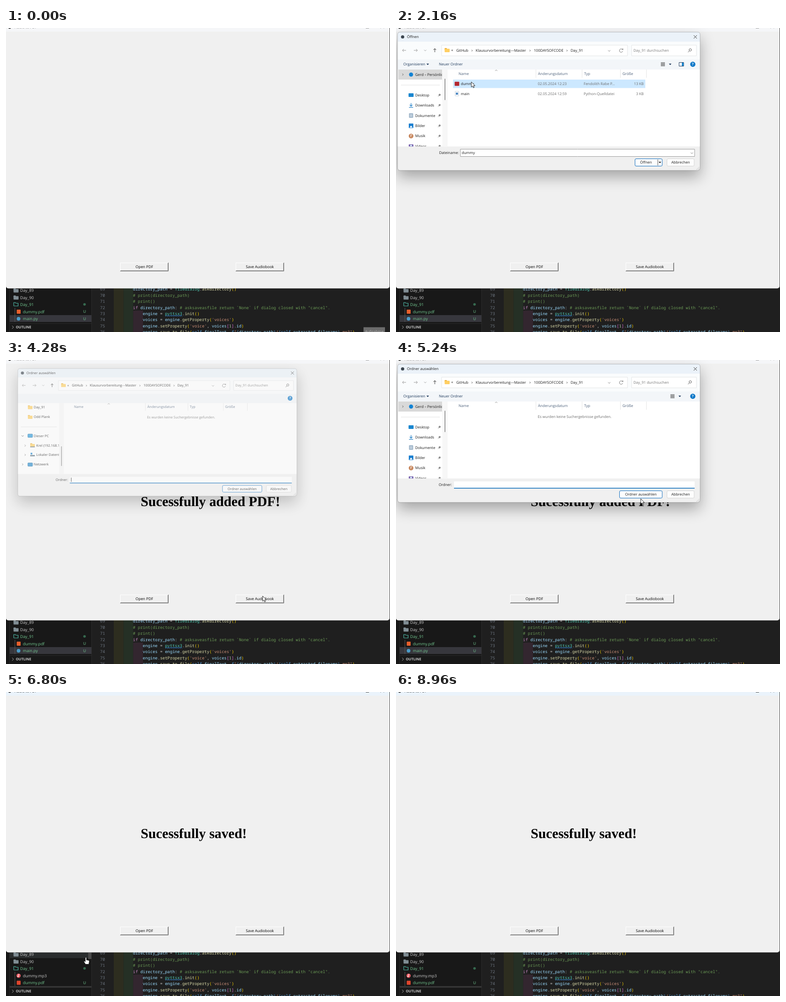
Recreate the animation shown at these times as an HTML page with a canvas. Size 841 px wide and 666 px high, loop 9020 ms.

```html
<!DOCTYPE html>
<html lang="de">
<head>
<meta charset="utf-8">
<title>PDF to audiobook</title>
<style>
html, body { margin: 0; width: 100%; height: 100%; overflow: hidden; background: #1f1f1f; }
canvas { display: block; }
</style>
</head>
<body>
<canvas id="stage" width="841" height="666"></canvas>
<script>
const W = 841, H = 666, LOOP = 9020;
const UI = '"Open Sans", "Noto Sans", sans-serif';
const MONO = '"Noto Sans Mono", "DejaVu Sans Mono", monospace';
const SERIF = '"Liberation Serif", serif';
const screen = document.getElementById('stage').getContext('2d');
const layerCanvas = document.createElement('canvas');
layerCanvas.width = W;
layerCanvas.height = H;
const layer = layerCanvas.getContext('2d');
// Fractional glyph advances keep small text at its true width
screen.textRendering = layer.textRendering = 'geometricPrecision';
let g = screen;

// Moments of the story
const OPEN_IN = 1202, OPEN_OUT = 3020, PICK = 2160;
const SAVE_IN = 4236, SAVE_OUT = 5300, SAVED = 5850, FILE_ADDED = 6050;

// Pointer path: time, x, y
const PATH = [
  [400, 776, 636], [750, 313, 524], [1140, 313, 524], [1350, 302, 469],
  [1760, 155, 96], [1900, 155, 96], [1960, 165, 118], [2200, 165, 118],
  [2860, 551, 301], [3150, 551, 301], [3800, 562, 517], [4350, 562, 517],
  [5030, 536, 304], [5850, 536, 304], [6740, 175, 581], [6800, 175, 581],
  [7270, 150, 620], [7490, 150, 620], [7750, 178, 592], [8350, 461, 655],
  [8480, 466, 668]
];

const clamp = v => Math.max(0, Math.min(1, v));
const within = (t, a, b) => t >= a && t < b;

function pointerAt(t) {
  for (let i = 1; i < PATH.length; i++) {
    const [t0, x0, y0] = PATH[i - 1], [t1, x1, y1] = PATH[i];
    if (!within(t, t0, t1)) continue;
    const p = (t - t0) / (t1 - t0), e = p * p * (3 - 2 * p);
    return { x: x0 + (x1 - x0) * e, y: y0 + (y1 - y0) * e };
  }
  return null;
}

function box(x, y, w, h, fill, stroke, r = 0) {
  g.beginPath();
  g.roundRect(x, y, w, h, r);
  if (fill) { g.fillStyle = fill; g.fill(); }
  if (stroke) { g.strokeStyle = stroke; g.lineWidth = 1; g.stroke(); }
}

function dot(x, y, r, color) {
  g.beginPath();
  g.arc(x, y, r, 0, 7);
  g.fillStyle = color;
  g.fill();
}

function line(color, width, ...pts) {
  g.beginPath();
  for (let i = 0; i < pts.length; i += 2) g.lineTo(pts[i], pts[i + 1]);
  g.strokeStyle = color;
  g.lineWidth = width;
  g.stroke();
}

function shape(fill, ...pts) {
  g.beginPath();
  for (let i = 0; i < pts.length; i += 2) g.lineTo(pts[i], pts[i + 1]);
  g.closePath();
  g.fillStyle = fill;
  g.fill();
}

// y is the middle of the line of text
function text(s, x, y, color = '#1b1b1b', size = 8, align = 'left', family = UI, weight = '') {
  g.font = `${weight} ${size}px ${family}`;
  g.textAlign = align;
  g.fillStyle = color;
  g.fillText(s, x, y + size * 0.35);
}

const down = (x, y, c = '#444', r = 2.5) => line(c, 0.9, x - r, y - r / 2, x, y + r / 2, x + r, y - r / 2);
const right = (x, y, c = '#555', r = 2.2) => line(c, 0.9, x - r / 2, y - r, x + r / 2, y, x - r / 2, y + r);
const drop = (x, y, c = '#222') => shape(c, x - 2.8, y - 1.4, x + 2.8, y - 1.4, x, y + 1.8);

function folder(x, y, color = '#ffcf62', back = '#e8a92f') {
  box(x - 5.5, y - 4.5, 5, 4, back, null, 1);
  box(x - 5.5, y - 3, 11, 7.5, color, null, 1);
}

// ---- editor behind the window ----

const INK = { w: '#cccccc', v: '#9cdcfe', f: '#dcdcaa', m: '#4ec9b0', s: '#ce9178', c: '#6a9955',
  k: '#c586c0', b: '#569cd6', n: '#b5cea8', y: '#ffd700', p: '#da70d6' };
const CODE = [
  ['v', 'directory_path', 'w', ' = ', 'm', 'filedialog', 'w', '.', 'f', 'askdirectory', 'y', '()'],
  ['c', '# print(directory_path)'],
  ['c', '# print()'],
  ['k', 'if', 'v', ' directory_path', 'w', ': ', 'c',
    '# asksaveasfile return `None` if dialog closed with "cancel".'],
  ['v', '    engine', 'w', ' = ', 'm', 'pyttsx3', 'w', '.', 'f', 'init', 'y', '()'],
  ['v', '    voices', 'w', ' = ', 'v', 'engine', 'w', '.', 'f', 'getProperty', 'y', '(', 's', "'voices'", 'y', ')'],
  ['v', '    engine', 'w', '.', 'f', 'setProperty', 'y', '(', 's', "'voice'", 'w', ', ', 'v', 'voices',
    'p', '[', 'n', '1', 'p', ']', 'w', '.', 'v', 'id', 'y', ')'],
  ['v', '    engine', 'w', '.', 'f', 'save_to_file', 'y', '(', 'b', 'self', 'w', '.', 'v', 'finalText', 'w', ', ',
    'b', 'f', 's', '"', 'b', '{', 'v', 'directory_path', 'b', '}', 's', '/', 'b', '{self', 'w', '.',
    'v', 'extracted_filename', 'b', '}', 's', '.mp3"', 'y', ')']
];

function drawCode() {
  const step = 5.4;
  box(188, 560, 653, 106, '#1f1f1f');
  box(236, 560, 21.5, 106, '#2d2d1f');
  box(257.5, 560, 21, 106, '#253025');
  box(278.5, 619, 21.5, 47, '#33262f');
  CODE.forEach((tokens, i) => {
    const y = 572.3 + i * 13.35;
    text(String(69 + i), 206, y, '#6e7681', 9, 'left', MONO);
    let x = 278;
    for (let k = 0; k < tokens.length; k += 2) {
      text(tokens[k + 1], x, y, INK[tokens[k]], 9, 'left', MONO, 500);
      x += tokens[k + 1].length * step;
    }
  });
  g.beginPath();
  for (let x = 349; x < 386; x += 0.5) g.lineTo(x, 630.5 + Math.sin(x * 1.6));
  g.strokeStyle = '#3794ff';
  g.lineWidth = 0.9;
  g.stroke();
}

function drawTree(t, ptr) {
  const rowY = i => 575 + i * 15.5, green = '#73c991', grey = '#cccccc';
  const added = t >= FILE_ADDED;
  box(0, 560, 187, 106, '#181818');
  line('#2b2b2b', 1, 187.5, 560, 187.5, H);
  line('#2b2b2b', 1, 7.5, 560, 7.5, H);
  const inTree = ptr && ptr.x < 187 && ptr.y > 570;
  if (!added) box(8, 629, 179, 15, '#37373d');
  if (inTree && ptr.y < 645) {
    const i = Math.round((ptr.y - 575) / 15.5);
    box(8, rowY(i) - 7.5, 179, 15.5, '#2a2d2e');
  }
  folder(22, rowY(0), '#7f8c93', '#7f8c93');
  folder(22, rowY(1), '#7f8c93', '#7f8c93');
  line('#4db6a4', 1.2, 17, 609, 17, 601.5, 20.5, 601.5, 22, 603, 26.5, 603, 26.5, 609, 17, 609);
  text('Day_89', 31, rowY(0), grey, 8.8);
  text('Day_90', 31, rowY(1), grey, 8.8);
  text('Day_91', 31, rowY(2), green, 8.8);
  dot(172, 605.5, 2.8, '#36694e');
  line('#585858', 1, 19.5, 613, 19.5, 644);
  const pdfY = rowY(added ? 4 : 3);
  box(23.5, pdfY - 4.5, 8.5, 9, added ? '#e0452c' : '#e8602c', null, 1);
  text('dummy.pdf', 37, pdfY, green, 8.8);
  text('U', 169, pdfY, green, 8.5);
  if (added) {
    dot(27.5, rowY(3), 4.6, '#ef5c64');
    line('#fff', 0.9, 27.2, 623, 27.2, 618.5, 29.4, 619.5);
    dot(26.4, 623, 1.2, '#fff');
    text('dummy.mp3', 37, rowY(3), grey, 8.8);
    box(8, 644.5, 179, 3, '#3a3a3a');
  } else {
    dot(27.5, rowY(4), 4, '#4b9cc8');
    text('main.py', 37, rowY(4), green, 8.8);
    text('U', 169, rowY(4), green, 8.5);
    line('#2b2b2b', 1, 8, 647.5, 187, 647.5);
  }
  if (inTree) box(180, 571, 7, 14, '#4a4a4a');
  right(15, 655.5, '#ccc', 3.2);
  text('OUTLINE', 21.5, 655.5, '#cccccc', 7.7, 'left', UI, 'bold');
}

// ---- application window ----

function tkButton(label, x, pressed) {
  const y = 514, w = 106, h = 19, d = pressed ? 1 : 0;
  box(x, y, w, h, '#f0f0f0');
  line(pressed ? '#696969' : '#ffffff', 1, x + 0.5, y + h, x + 0.5, y + 0.5, x + w, y + 0.5);
  line(pressed ? '#e3e3e3' : '#a0a0a0', 1, x + 1, y + h - 1.5, x + w - 1.5, y + h - 1.5, x + w - 1.5, y + 1);
  line(pressed ? '#ffffff' : '#696969', 1, x, y + h - 0.5, x + w - 0.5, y + h - 0.5, x + w - 0.5, y);
  text(label, x + w / 2 + d, y + 9 + d, '#000', 8.2, 'center');
}

function drawApp(t) {
  const active = within(t, 1020, OPEN_IN) || within(t, 3040, SAVE_IN) || t >= SAVE_OUT;
  const ink = active ? '#222' : '#8a8a8a';
  box(840, 0, 1, 570, '#4a4a4a');
  box(0, 0, 840, 570.5, '#f0f0f0', null, [0, 0, 5, 5]);
  box(0, 0, 840, 8, active ? '#eaf3fb' : '#f5f6f8');
  dot(8, -1.5, 3.2, '#333');
  text('Audio to PDF', 19, -2, ink);
  line(ink, 1, 788, 0.3, 795, 0.3);
  line(ink, 0.9, 820, 0.6, 823, -2);
  line(ink, 0.9, 828, 0.6, 825, -2);
  tkButton('Open PDF', 250, within(t, 1020, 1120));
  tkButton('Save Audiobook', 503, within(t, 4100, 4190));
  if (t >= 3200) {
    const msg = t < SAVED ? 'Sucessfully added PDF!' : 'Sucessfully saved!';
    g.font = `bold 30.2px ${SERIF}`;
    g.textAlign = 'left';
    g.fillStyle = '#000';
    g.fillText(msg, 295, 320);
  }
}

// ---- file dialogs ----

function clipped(x, y, w, h, draw) {
  g.save();
  g.beginPath();
  g.rect(x, y, w, h);
  g.clip();
  draw();
  g.restore();
}

function pin(x, y) {
  line('#707070', 0.8, x - 3, y + 3, x - 0.5, y + 0.5);
  shape('#8a8a8a', x - 2.2, y - 0.6, x + 0.8, y - 3.2, x + 3.2, y - 0.8, x + 0.6, y + 2.2);
}

function homePane() {
  const names = ['Desktop', 'Downloads', 'Dokumente', 'Bilder', 'Musik', 'Videos'];
  box(5, 91, 96, 22, '#d9d9d9');
  right(15, 102);
  dot(33, 102, 4.5, '#1283d4');
  text('Gerd – Persönlich', 42, 102);
  line('#e0e0e0', 1, 11, 125, 96, 125);
  names.forEach((name, i) => {
    const y = 147 + i * 22.4;
    text(name, 42, y);
    pin(95, y);
    if (i === 0) box(27.5, y - 4, 11, 8, '#1a86cf', null, 1);
    if (i === 1) {
      line('#1779c4', 1.2, 33, y - 5, 33, y + 2);
      line('#1779c4', 1.2, 30, y - 1, 33, y + 2, 36, y - 1);
      line('#1779c4', 1.2, 28.5, y + 4.5, 37.5, y + 4.5);
    }
    if (i === 2) {
      box(28.5, y - 5, 9, 10, '#9db4c8', null, 1);
      for (let k = -2; k < 4; k += 2) line('#f4f8fb', 0.8, 30.5, y + k, 35.5, y + k);
    }
    if (i === 3) {
      box(28, y - 5, 10, 10, '#1a7fd0', null, 1);
      shape('#fff', 29.5, y + 4, 33, y - 0.5, 36.5, y + 4);
    }
    if (i === 4) {
      dot(33, y, 5.2, '#c98a62');
      line('#fff', 1, 32.5, y + 2, 32.5, y - 3, 35, y - 2);
    }
    if (i === 5) {
      box(28, y - 4, 10, 9, '#6a4fa3', null, 1);
      box(30.5, y - 3, 5, 3, '#cfe4f5');
    }
  });
}

function devicePane() {
  folder(33, 101);
  text('Day_91', 41.5, 101);
  folder(33, 124);
  text('Odd Plank', 41.5, 124);
  line('#e0e0e0', 1, 11, 147.5, 96, 147.5);
  down(15, 169, '#222');
  box(27.5, 164.5, 11, 8, '#2b9bdc', '#1b6fa8', 1);
  text('Dieser PC', 41.5, 169);
  right(21, 192);
  folder(38.5, 191);
  box(33, 194, 11, 2, '#5b7080');
  text('Krel (192.168.1.20)', 47.5, 192);
  right(21, 214);
  box(33, 214.5, 11, 3, '#5b7080');
  box(34, 209, 4, 4, '#1a86cf');
  text('Lokaler Datenträger', 47.5, 214);
  right(15, 236.7);
  box(27.5, 233, 11, 8, '#2b8fd0', '#1b6fa8', 1);
  text('Netzwerk', 41.5, 236.7);
}

function fileRow(name, type, size, y, icon) {
  const meta = '#6d6d6d';
  icon(y);
  text(name, 142, y);
  text('02.05.2024 12:' + (size > 9 ? '23' : '59'), 310.5, y, meta);
  text(type, 411, y, meta);
  text(size + ' KB', 542.5, y, meta, 8, 'right');
}

function navBar(pick) {
  const hint = '#767676';
  box(3.5, 30, 662.5, 39, '#fafcfd');
  for (const [x, d, c] of [[18, -1, '#999'], [43, 1, '#999']]) {
    line(c, 1, x - 4, 49, x + 4, 49);
    line(c, 1, x + d, 46, x + d * 4, 49, x + d, 52);
  }
  down(64, 49, '#999');
  line('#333', 1, 85, 45, 85, 53);
  line('#333', 1, 82, 48, 85, 45, 88, 48);
  box(100, 37.5, 407, 23.5, '#fff', '#e2e4e6');
  folder(112, 48.5);
  text('«', 121, 48.5);
  text('GitHub', 132, 49);
  text('Klausurvorbereitung---Master', 174.5, 49);
  text('100DAYSOFCODE', 302, 49);
  text('Day_91', 382.5, 49);
  for (const x of [166.5, 293.5, 374.5]) right(x, 49.5, '#333', 1.8);
  down(467, 50, '#777');
  g.beginPath();
  g.arc(493, 49.5, 3.6, 0.3, 5.6);
  g.strokeStyle = '#777';
  g.lineWidth = 1;
  g.stroke();
  shape('#777', 494.5, 46, 497.5, 45, 497.5, 48.5);
  box(516, 37.5, 142, 23.5, '#fff', '#e2e4e6');
  text('Day_91 durchsuchen', 520, 49, hint);
  g.beginPath();
  g.arc(644.5, 48, 2.6, 0, 7);
  g.strokeStyle = '#555';
  g.stroke();
  line('#555', 1, 642.6, 50, 639.5, 53);

  box(3.5, 69, 662.5, 22, '#f3f6f9');
  dot(650, 79.5, 5.7, '#0f78c8');
  text('?', 650, 79.5, '#fff', 8, 'center', UI, 'bold');
  if (!pick.loaded) return;
  const navy = '#1e395b', lx = pick.folder ? 601 : 580;
  text('Organisieren', 16, 79.5, navy);
  drop(69.5, 79.5, navy);
  text('Neuer Ordner', 94, 79.5, navy);
  for (let y = 76; y < 84; y += 2.3) line('#333', 1, lx, y, lx + 9, y);
  drop(lx + 20.5, 79.5, navy);
  if (!pick.folder) {
    box(620, 75.5, 10, 8, '#fff', '#1e395b');
    box(626, 76, 4, 7, '#1a86cf');
  }
}

function button(label, x, w, blue, fill = '#fdfdfd') {
  box(x + 0.5, 286.5, w - 1, 16, fill, blue ? '#0f6cbd' : '#d4d4d4', 2.5);
  if (label) text(label, x + w / 2, 294.5, '#1b1b1b', 8, 'center');
}

function dialogBody(pick) {
  g.save();
  g.shadowColor = 'rgba(0,0,0,.32)';
  g.shadowBlur = 32;
  g.shadowOffsetY = 14;
  box(3.5, 9, 662.5, 303, '#f0f0f0', null, 5);
  g.restore();
  box(3.5, 9, 662.5, 21, '#ebf2f9', null, [5, 5, 0, 0]);
  if (!pick.closing || pick.folder) {
    dot(14.5, 19.5, 3.6, '#3c4650');
    text(pick.title, 24, 19.5);
  } else {
    text(pick.title, 10, 19.5);
  }
  line('#333', 1, 652, 16, 659, 23);
  line('#333', 1, 659, 16, 652, 23);
  navBar(pick);

  box(3.5, 91, 662.5, 168.5, '#fff');
  box(101.5, 91, 11.5, 168.5, '#f7f7f7');
  clipped(3.5, 91, 97.5, 168.5, pick.home ? homePane : devicePane);
  box(106.5, pick.home ? 111 : 193.5, 1.6, 47, '#858585', null, 0.8);

  const head = '#4c607a';
  text('Name', 137, 100, head);
  text('Änderungsdatum', 311, 100, head);
  text('Typ', 412, 100, head);
  text('Größe', 496, 100, head);
  line('#777', 0.8, 217, 94, 219.5, 91.8, 222, 94);
  for (const x of [306.5, 407.5, 491.5, 548.5]) line('#e5e5e5', 1, x, 91, x, 109);

  if (pick.folder) {
    text('Es wurden keine Suchergebnisse gefunden.', 310.5, 124.5, '#6d6d6d');
    text('Ordner:', 122.5, 273.5, '#1b1b1b', 8, 'right');
    box(127, 266, 527, 15, '#fff');
    line('#0067b8', 1.6, 127, 280.7, 654, 280.7);
    if (pick.caret) line('#000', 1, 130.5, 268, 130.5, 278);
    button('Ordner auswählen', 489, 94.5, true);
  } else {
    if (pick.row) box(125, 113, 421, 18.5, pick.row);
    fileRow('dummy', 'Fendolith Rabe P...', 13, 122.3, y => box(128.5, y - 4.5, 10, 9, '#b3262e', null, 1));
    fileRow('main', 'Python-Quelldatei', 3, 143.8, y => {
      box(129.5, y - 5, 8, 10, '#fff', '#c9d2da');
      box(131.2, y - 2.2, 4.5, 4.5, '#3f7fbf');
    });
    text('Dateiname:', 137.5, 273.5, '#1b1b1b', 8, 'right');
    box(141, 265.5, 513, 16, '#fff', pick.name ? '#9a9a9a' : '#0f78c8');
    if (pick.name) text(pick.name, 144, 273.5);
    else if (pick.caret) line('#000', 1, 144.5, 268, 144.5, 279);
    down(648, 274, '#777');
    button('', 523, 60.5, true, pick.hot ? '#cbdff1' : '#fdfdfd');
    text('Öffnen', 547.5, 294.5, '#1b1b1b', 8, 'center');
    line(pick.hot ? '#0f6cbd' : '#555', 1, 573.5, 288, 573.5, 301);
    drop(578, 294.5);
  }
  button('Abbrechen', 593, 60.5, false);
  for (let i = 0; i < 3; i++)
    for (let k = 0; k <= i; k++) box(663 - k * 2.5, 304.5 + i * 2.3, 1, 1, '#a5a5a5');
  box(3.5, 9, 662.5, 303, null, 'rgba(0,0,0,.22)', 5);
}

function drawDialog(t, from, to, pick) {
  const grow = clamp((t - from) / 200), fade = clamp((t - to) / 180);
  if (t < from || fade >= 1) return;
  const s = (0.9 + 0.1 * grow) * (1 - 0.1 * fade);
  pick.loaded = t > from + (pick.folder ? 120 : 80);
  pick.home = t > from + 260;
  pick.caret = Math.floor((t - from) / 530) % 2 === 0;
  pick.closing = fade > 0;
  g = layer;
  g.setTransform(1, 0, 0, 1, 0, 0);
  g.clearRect(0, 0, W, H);
  g.setTransform(s, 0, 0, s, 291 * (1 - s), 135 * (1 - s));
  dialogBody(pick);
  g = screen;
  g.globalAlpha = Math.min(1, grow * 2.8) * (1 - fade);
  g.drawImage(layerCanvas, 0, 0);
  g.globalAlpha = 1;
}

// ---- pointer ----

function drawPointer({ x, y }) {
  g.save();
  g.translate(x, y);
  g.lineJoin = 'round';
  const hand = x < 187 && y > 570;
  const p = hand
    ? 'M-1.3 1Q0-1 1.3 1V6L5 6.6Q7.6 7 7.4 9.5L6.4 15.5H-.8L-4.4 10Q-4.4 8-2.8 8.6L-1.3 10Z'
    : 'M0 0V11.4L2.6 9L4.4 13L6.3 12.2L4.6 8.3H8.1Z';
  const path = new Path2D(p);
  g.fillStyle = '#fff';
  g.strokeStyle = '#111';
  g.lineWidth = 0.9;
  g.fill(path);
  g.stroke(path);
  g.restore();
}

function drawTip(t) {
  g.globalAlpha = t < 70 ? 1 : t < 130 ? 0.5 : 0;
  box(783, 655.5, 47, 12, '#6b6b6b');
  text('Aufnahme', 806.5, 665, '#b4b4b4', 8.4, 'center');
  g.globalAlpha = 1;
}

function render(t) {
  const ptr = pointerAt(t);
  g = screen;
  drawCode();
  drawTree(t, ptr);
  drawApp(t);
  drawDialog(t, OPEN_IN, OPEN_OUT, {
    title: 'Öffnen',
    name: t >= PICK ? 'dummy' : '',
    row: t >= 3000 ? '#d9d9d9' : t >= PICK ? '#cce8ff' : t >= 1900 ? '#e5f3ff' : null,
    hot: t >= 2780
  });
  drawDialog(t, SAVE_IN, SAVE_OUT, { title: 'Ordner auswählen', folder: true });
  drawTip(t);
  if (ptr) drawPointer(ptr);
}

const start = performance.now();
function tick() {
  render((performance.now() - start) % LOOP);
  requestAnimationFrame(tick);
}
tick();
</script>
</body>
</html>
```
